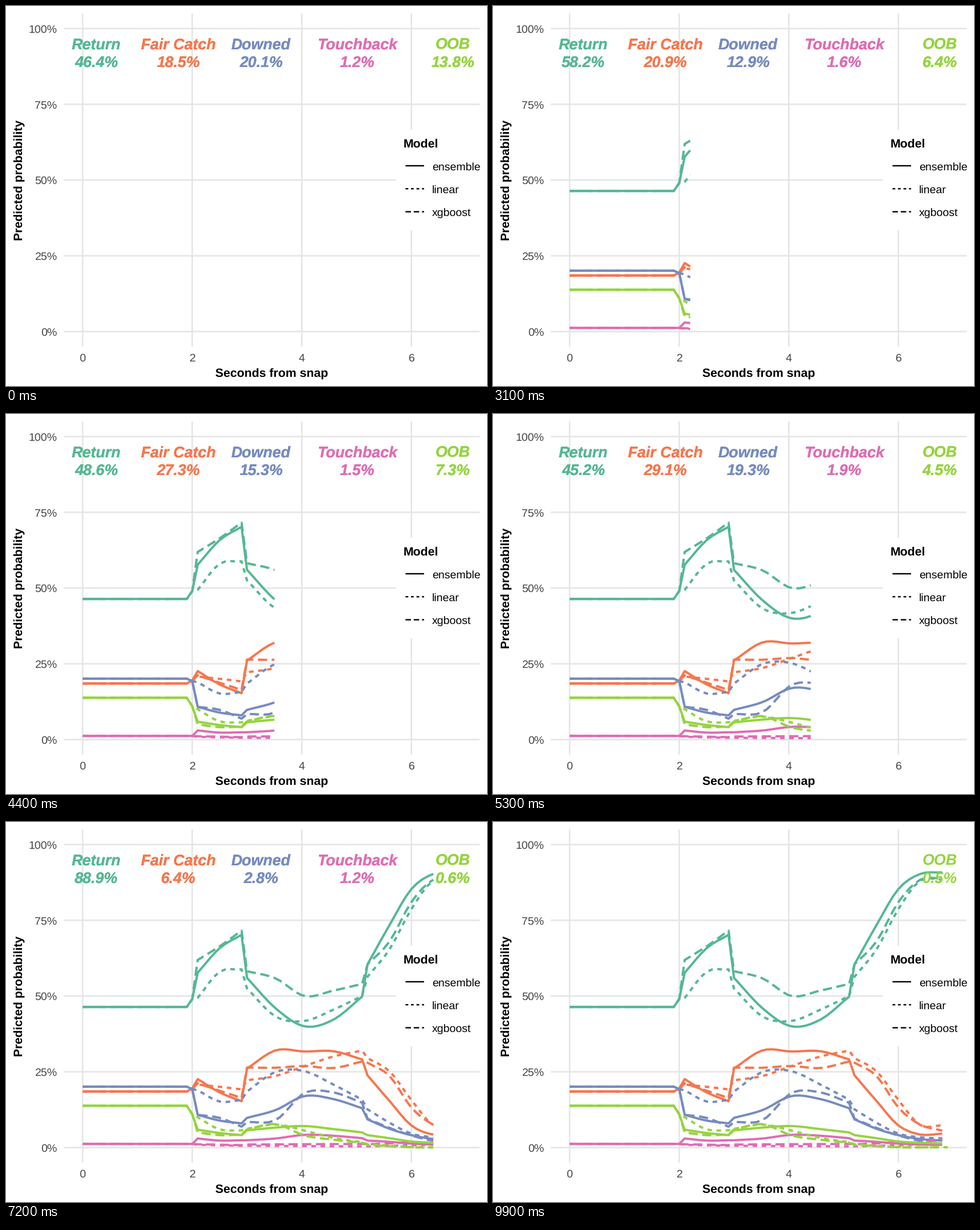
A matplotlib script that plays this animation: 841 px wide and 666 px high, repeating every 10000 ms.

```python
import numpy as np
import matplotlib.pyplot as plt
from matplotlib.animation import FuncAnimation
from matplotlib.patches import Rectangle

W, H, DPI = 841, 666, 100
FRAMES, INTERVAL = 100, 100
PX = 72 / DPI  # points per pixel
plt.rcParams.update({"font.family": "Liberation Sans", "text.hinting": "none",
                     "path.simplify": False, "path.snap": False})

# outcome: colour, label centre
OUTCOMES = {
    "Return": ("#55B793", 158),
    "Fair Catch": ("#F7764D", 301.7),
    "Downed": ("#768BC0", 446),
    "Touchback": ("#DF6DB3", 614),
    "OOB": ("#94D43E", 781),
}
MODELS = {"ensemble": "-", "linear": (0, (2, 2)), "xgboost": (0, (4, 2))}

# Times are in tenths of a second
SNAP, LAST, END = 20, 68, 69
PHASES = ((21, 29), (30, 51), (52, 68))  # the odds jump between phases


def smooth(levels, count):
    """Cubic Hermite curve through evenly spaced levels, at count points."""
    levels = np.array(levels, float)
    slopes = np.gradient(levels)
    u = np.linspace(0, len(levels) - 1, count)
    k = np.minimum(u.astype(int), len(levels) - 2)
    t = u - k
    ease = t * t * (3 - 2 * t)
    return (levels[k] + ease * (levels[k + 1] - levels[k])
            + t * (1 - t) ** 2 * slopes[k] - t * t * (1 - t) * slopes[k + 1])


def trace(before, at_snap, *phases):
    """Percent at every tenth of a second: flat, then one smooth run per phase."""
    runs = [smooth(levels, stop - start + 1)
            for levels, (start, stop) in zip(phases, PHASES)]
    return np.concatenate([[before] * SNAP, [at_snap], *runs, runs[-1][-1:]])


curves = {}
curves["Return", "ensemble"] = trace(
    46.4, 49, [57.7, 65.8, 70.2], [56, 45.9, 40, 42.2, 49.8], [60.5, 73.4, 85.3, 90.3, 90.8])
curves["Return", "linear"] = trace(
    46.4, 49, [49.4, 58, 58.8], [52.5, 43.2, 41.8, 45.5, 50], [56.4, 65.4, 78.7, 88.1, 88.4])
curves["Return", "xgboost"] = trace(
    46.4, 49, [61.9, 66.4, 71.6], [58.2, 55.8, 50, 51.8, 54], [60.5, 68, 81, 88.4, 88.8])

curves["Downed", "ensemble"] = trace(
    20.1, 19.3, [10.8, 8.9, 8], [9.8, 12.4, 17, 16, 13], [9.3, 6.2, 4.1, 2.8, 2.3])
curves["Downed", "linear"] = trace(
    20.1, 19.3, [18.9, 15.2, 15.7], [18.5, 25, 25.2, 20.8, 15.8], [12.6, 8.2, 4.6, 3.4, 3])
curves["Downed", "xgboost"] = trace(
    20.1, 19.3, [10.8, 9.8, 6.9], [8.4, 9.1, 18, 18.2, 14.8], [9.5, 6.5, 4, 2.3, 2.4])

curves["Touchback", "ensemble"] = trace(
    1.2, 1.2, [3, 2.3, 2.4], [2.4, 3, 4.2, 3.9, 3.1], [2.3, 1.9, 1.3, 1, 0.9])
curves["Touchback", "linear"] = trace(1.2, 1.2, [0.9, 0.6], [0.6, 0.4], [0.4, 1.2])
curves["Touchback", "xgboost"] = trace(
    1.2, 1.2, [1.1, 0.8], [1, 1.2], [1.1, 1.4, 1.7, 1.7, 3.1])

curves["OOB", "ensemble"] = trace(
    13.8, 11, [5.9, 4.8, 4.1], [5.7, 6.6, 7.1, 6.1, 5], [4.1, 3.1, 2, 1.6, 1.4])
curves["OOB", "linear"] = trace(
    13.8, 11, [10, 6, 5.7], [6.2, 7.6, 5.6, 3.2, 1.8], [1.1, 0.2, 0.05])
curves["OOB", "xgboost"] = trace(
    13.8, 11, [5, 4.1, 4.3], [6, 7.7, 4, 2.6, 1.6], [0.9, 0.1, 0.1])

# The five outcomes of a model add up to 100 percent
for model in MODELS:
    others = [curves[name, model] for name in OUTCOMES if name != "Fair Catch"]
    curves["Fair Catch", model] = 100 - np.sum(others, axis=0)


def px_x(tenths):
    return 134 + 9.58 * tenths


def px_y(percent):
    return 570.6 - 5.311 * percent


fig = plt.figure(figsize=(W / DPI, H / DPI), dpi=DPI, facecolor="white")
ax = fig.add_axes([0, 0, 1, 1])
ax.set(xlim=(0, W), ylim=(H, 0))
ax.axis("off")


def write(x, y, text, size, color="black", ha="center", **style):
    return ax.text(x, y, text, fontsize=size * PX, color=color, ha=ha,
                   va="baseline", zorder=6, **style)


def stroke(xs, ys, color, width, style="-", zorder=1):
    return ax.plot(xs, ys, color=color, lw=width * PX, ls=style, zorder=zorder,
                   solid_capstyle="butt", dash_capstyle="butt",
                   solid_joinstyle="round", dash_joinstyle="round")[0]


for percent in range(0, 101, 25):
    y = px_y(percent)
    stroke([101, 828], [y, y], "#E5E5E5", 2.6)
    write(89.5, y + 7.2, f"{percent}%", 19.5, "#444444", ha="right")
for second in range(0, 7, 2):
    x = px_x(10 * second)
    stroke([x, x], [13, 597], "#E5E5E5", 2.6)
    write(x, 623, str(second), 19.5, "#444444")
write(464.5, 649.3, "Seconds from snap", 21.3, weight="bold")
write(28.7, 305.3, "Predicted probability", 21.3, weight="bold",
      rotation=90, rotation_mode="anchor")

ax.add_patch(Rectangle((682, 217), W - 682, 176, fc="white", ec="none", zorder=4))
write(694.5, 247.5, "Model", 21.3, ha="left", weight="bold")
for row, (model, style) in enumerate(MODELS.items()):
    y = 280 + 40.3 * row
    stroke([698.5, 731], [y, y], "black", 2.4, style, zorder=5)
    write(745, y + 7.8, model, 19.5, ha="left")

lines = {(name, model): stroke([], [], color, 4, style, zorder=3)
         for name, (color, _) in OUTCOMES.items()
         for model, style in MODELS.items()}
# One label per model, stacked on the same spot
titles, values = {}, {}
for name, (color, x) in OUTCOMES.items():
    font = dict(size=26.8, color=color, weight="bold", style="italic")
    titles[name] = [write(x, 76, name, **font) for _ in MODELS]
    values[name] = [write(x, 108, "", **font) for _ in MODELS]


def head_at(frame):
    """Reveal position: steady steps, then a slow crawl over the last points."""
    if frame <= 72:
        return max(0, round((frame - 10) * 64 / 62))
    return min(END, 64 + (frame - 72) * 5 / 26)


def draw(frame):
    head = head_at(frame)
    for key, line in lines.items():
        stop = min(head, END if key == ("OOB", "xgboost") else LAST)
        ts = np.append(np.arange(np.ceil(stop)), stop) if stop else np.array([])
        line.set_data(px_x(ts), px_y(np.interp(ts, np.arange(END + 1), curves[key])))
    step = min(LAST, int(head + 0.5))
    for name in OUTCOMES:
        mean = np.mean([curves[name, model][step] for model in MODELS])
        for copy, (title, value) in enumerate(zip(titles[name], values[name])):
            shown = head <= LAST or (name == "OOB" and copy == 0)
            title.set_visible(shown)
            value.set_visible(shown)
            value.set_text(f"{mean:.1f}%")
    return []


anim = FuncAnimation(fig, draw, frames=FRAMES, interval=INTERVAL,
                     repeat=True, repeat_delay=0, blit=False)
plt.show()
```
